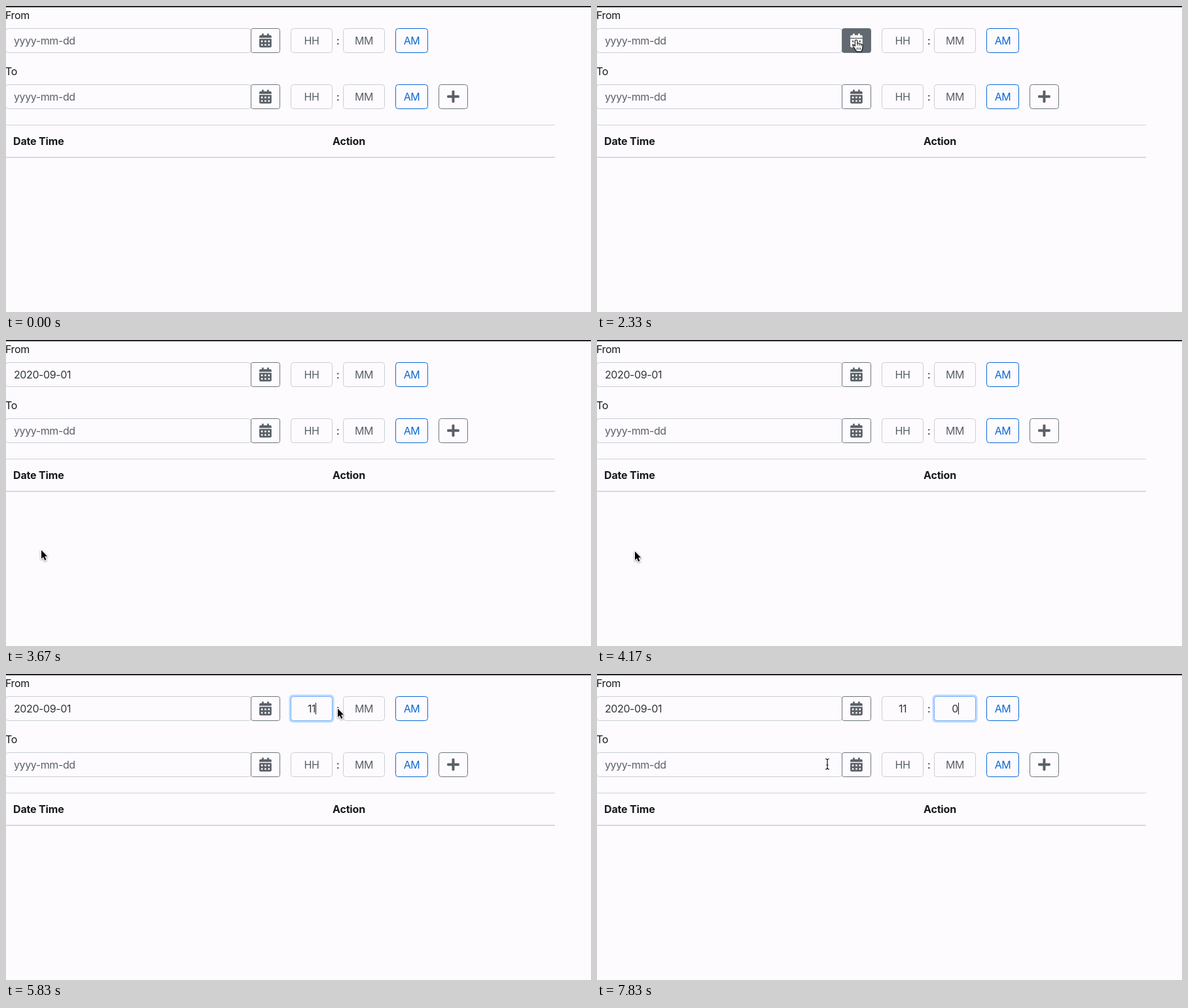
Write an HTML page with a canvas that moves like this. It is 894x469 px and loops after 8 s.

```html
<!DOCTYPE html>
<html lang="en">
<head>
<meta charset="utf-8">
<title>Date range form</title>
<style>
html, body { margin: 0; width: 100%; height: 100%; overflow: hidden; background: #fefbff; }
canvas { display: block; }
</style>
</head>
<body>
<canvas id="stage" width="894" height="469"></canvas>
<script>
const ctx = document.getElementById('stage').getContext('2d');
const LOOP = 8000, FPS = 6;
const BG = '#fefbff', INK = '#16191d', VALUE = '#30363c', HINT = '#596068';
const MUTED = '#6c757d', ICON = '#596068', LINE = '#c8ced4', BLUE = '#0769d6';

// Steps at which the form changes
const HOVER = [10, 17], POPUP = [15, 22];
const FOCUS_HH = 30, FOCUS_MM = 37;

// Pointer path: step, x, y, shape
const PATH = [
  [1, 800, 283, 'arrow'], [4, 630, 190, 'arrow'], [7, 436, 92, 'arrow'],
  [9, 398, 60, 'arrow'], [10, 397, 54, 'hand'], [15, 396, 52, 'hand'],
  [17, 381, 50, 'hand'], [18, 262, 150, 'arrow'], [19, 112, 365, 'arrow'],
  [20, 76, 382, 'arrow'], [21, 54, 319, 'hand'], [22, 54, 322, 'arrow'],
  [23, 55, 328, 'arrow'], [25, 58, 324, 'arrow'], [26, 128, 272, 'arrow'],
  [27, 310, 172, 'arrow'], [28, 432, 80, 'arrow'], [29, 466, 54, 'beam'],
  [34, 470, 54, 'beam'], [35, 507, 53, 'arrow'], [36, 540, 54, 'beam'],
  [39, 548, 54, 'beam'], [40, 600, 50, 'hand'], [41, 617, 48, 'hand'],
  [43, 614, 49, 'hand'], [44, 545, 80, 'arrow'], [45, 440, 112, 'arrow'],
  [46, 366, 134, 'beam'], [47, 352, 138, 'beam']
];

function text(str, x, y, color = INK, { size = 16, style = '', align = 'left' } = {}) {
  ctx.font = `${style} ${size}px Inter, "Open Sans", sans-serif`;
  ctx.letterSpacing = -size * (style === 'bold' ? 0.01 : 0.025) + 'px';
  ctx.textAlign = align;
  ctx.fillStyle = color;
  ctx.fillText(str, x, y);
}

function box(x, y, w, h, stroke, fill, r = 4, lw = 1) {
  ctx.beginPath();
  ctx.roundRect(x + lw / 2, y + lw / 2, w - lw, h - lw, r);
  if (fill) { ctx.fillStyle = fill; ctx.fill(); }
  if (stroke) { ctx.strokeStyle = stroke; ctx.lineWidth = lw; ctx.stroke(); }
}

function rect(x, y, w, h, color) {
  ctx.fillStyle = color;
  ctx.fillRect(x, y, w, h);
}

function poly(points, color) {
  ctx.beginPath();
  points.forEach(([x, y]) => ctx.lineTo(x, y));
  ctx.closePath();
  ctx.fillStyle = color;
  ctx.fill();
}

// Icons are laid out on a 448 x 512 grid
const calendarIcon = new Path2D();
calendarIcon.roundRect(0, 64, 448, 96, [48, 48, 12, 12]);
calendarIcon.roundRect(96, 0, 64, 64, [12, 12, 0, 0]);
calendarIcon.roundRect(288, 0, 64, 64, [12, 12, 0, 0]);
calendarIcon.roundRect(0, 192, 448, 320, [12, 12, 48, 48]);
for (const x of [64, 192, 320])
  for (const y of [256, 384]) calendarIcon.roundRect(x, y, 64, 64, 12);

const plusIcon = new Path2D();
plusIcon.roundRect(0, 208, 448, 96, 32);
plusIcon.roundRect(176, 32, 96, 176, [32, 32, 0, 0]);
plusIcon.roundRect(176, 304, 96, 176, [0, 0, 32, 32]);

function iconButton(x, y, icon, hot, r) {
  box(x, y, 45, 38, MUTED, hot ? '#626970' : BG, r);
  ctx.save();
  ctx.translate(x + 13.1, y + 8.2);
  ctx.scale(1 / 24, 1 / 24);
  ctx.fillStyle = hot ? '#fff' : ICON;
  ctx.fill(icon, 'evenodd');
  ctx.restore();
}

function timeField(x, y, hint, value, focused) {
  if (focused) box(x - 3, y - 3, 70, 44, null, '#bbdaff', 6);
  box(x, y, 64, 38, focused ? '#76b2f5' : LINE, BG);
  text(value || hint, x + 32, y + 25, value ? VALUE : HINT, { align: 'center' });
  if (focused) {
    const half = value ? ctx.measureText(value).width / 2 : 0;
    rect(Math.round(x + 32 + half), y + 10, 1, 18, '#222');
  }
}

function row(label, y, { date, hot, hh, mm, focus } = {}) {
  text(label, -1, y - 14);
  box(-1, y, 376, 38, LINE, BG);
  text(date || 'yyyy-mm-dd', 12, y + 25, date ? VALUE : HINT);
  iconButton(374, y, calendarIcon, hot, 3);
  timeField(435, y, 'HH', hh, focus === 'hh');
  text(':', 507, y + 25, INK, { align: 'center' });
  timeField(515, y, 'MM', mm, focus === 'mm');
  box(595, y, 50, 38, BLUE, BG);
  text('AM', 620, y + 25, BLUE, { align: 'center' });
}

function form(step) {
  rect(0, 0, 894, 469, BG);
  rect(0, 0, 894, 2, '#242327');
  const typed = (str, ...at) => str.slice(0, at.filter(s => step >= s).length);
  row('From', 34, {
    date: step >= POPUP[1] ? '2020-09-01' : '',
    hot: step >= HOVER[0] && step <= HOVER[1],
    hh: typed('11', 32, 33),
    mm: typed('0', 39),
    focus: step >= FOCUS_MM ? 'mm' : step >= FOCUS_HH ? 'hh' : ''
  });
  row('To', 120);
  iconButton(661, 120, plusIcon, false, 4);
  rect(0, 182, 839, 1, '#cfd3d8');
  rect(0, 231, 839, 2, '#d4dadf');
  text('Date Time', 11, 213, INK, { style: 'bold' });
  text('Action', 499, 213, INK, { style: 'bold' });
}

function select(x, label) {
  box(x, 80, 76, 30, LINE, BG);
  text(label, x + 9, 101, VALUE, { size: 14 });
  const c = x + 59;
  poly([[c - 4, 94], [c, 89.5], [c + 4, 94]], '#343a40');
  poly([[c - 4, 96.5], [c, 101], [c + 4, 96.5]], '#343a40');
}

function chevron(x, dir, color) {
  ctx.beginPath();
  ctx.moveTo(x - 3.5 * dir, 88);
  ctx.lineTo(x + 3.5 * dir, 95.3);
  ctx.lineTo(x - 3.5 * dir, 102.6);
  ctx.strokeStyle = color;
  ctx.lineWidth = 2.8;
  ctx.stroke();
}

function popup(hoverNext) {
  box(-1, 74, 234, 267, '#c6cacf', BG);
  rect(0, 75, 232, 68, '#f5f5f9');
  rect(0, 143, 232, 1, '#d5d9de');
  chevron(19, -1, '#8d9298');
  chevron(212.5, 1, '#0b6fe0');
  select(40, 'Aug');
  select(116, '2020');
  'Mo Tu We Th Fr Sa Su'.split(' ').forEach((d, i) =>
    text(d, 20 + 32 * i, 131, '#148a9d', { size: 12.8, style: 'italic', align: 'center' }));
  box(3, 303, 34, 34, '#0b5cb8', '#d4d9df', 3, 2);
  if (hoverNext) box(36, 304, 32, 32, null, '#f1f2f5');
  for (let i = 0; i < 42; i++) {
    const day = new Date(2020, 6, 27 + i).getDate();
    const color = i === 35 ? INK : '#9da2a7';
    text(day, 20 + 32 * (i % 7), 166 + 32 * Math.floor(i / 7), color, { align: 'center' });
  }
}

const ARROW = new Path2D('M0 0V13.2L3 10.4L5.2 15.6L7.4 14.7L5.2 9.6H9.2Z');
const HAND = new Path2D('M-1.8 1.2C-1.8 -1 1.4 -1 1.6 1.2V5.2C2.2 4.4 4 4.4 4.6 5.8C5.4 5 7 5.2 7.4 6.6' +
  'C8.4 6 9.7 6.6 9.7 8.2V11.5C9.7 14 8 15 8 17.3H.2C.2 15.4 -2.2 13.6 -3.4 11.2' +
  'C-4.6 9.6 -5.6 8.6 -4.8 7.8C-3.8 6.8 -2.6 8 -1.8 9Z');
const FINGERS = new Path2D('M1.6 5V8.2M4.6 6V8.6M7.4 6.8V9M1.3 11.3V14.6M3.9 11.3V14.6M6.4 11.3V14.6');
const BEAM = new Path2D('M-3 -8Q0 -8 0 -6Q0 -8 3 -8M0 -6V6M-3 8Q0 8 0 6Q0 8 3 8M-1.5 1.5H1.5');

function pointerAt(step) {
  const i = PATH.findLastIndex(p => p[0] <= step);
  if (i < 0) return null;
  const a = PATH[i], b = PATH[i + 1] || a;
  const u = b === a ? 0 : (step - a[0]) / (b[0] - a[0]);
  return { x: a[1] + (b[1] - a[1]) * u, y: a[2] + (b[2] - a[2]) * u, shape: a[3] };
}

function stroke(path, color, width) {
  ctx.strokeStyle = color;
  ctx.lineWidth = width;
  ctx.stroke(path);
}

function pointer({ x, y, shape }) {
  ctx.save();
  ctx.translate(x, y);
  ctx.lineJoin = 'round';
  if (shape === 'beam') {
    stroke(BEAM, '#fff', 2.6);
    stroke(BEAM, '#111', 1.2);
  } else {
    ctx.shadowColor = 'rgba(0,0,0,.35)';
    ctx.shadowBlur = 3;
    ctx.shadowOffsetY = 1;
    ctx.fillStyle = '#fff';
    ctx.fill(shape === 'hand' ? HAND : ARROW);
    if (shape === 'arrow') stroke(ARROW, '#fff', 2);
    ctx.shadowColor = 'transparent';
    if (shape === 'hand') {
      stroke(HAND, '#111', 1.1);
      stroke(FINGERS, '#111', 0.9);
    } else {
      ctx.fillStyle = '#000';
      ctx.fill(ARROW);
    }
  }
  ctx.restore();
}

function draw(now) {
  const step = Math.floor((now % LOOP) * FPS / 1000 + 0.021) % (LOOP * FPS / 1000);
  form(step);
  if (step >= POPUP[0] && step < POPUP[1]) popup(step === 21);
  const p = pointerAt(step);
  if (p) pointer(p);
}

const start = performance.now();
function tick() {
  draw(performance.now() - start);
  requestAnimationFrame(tick);
}
tick();
</script>
</body>
</html>
```
